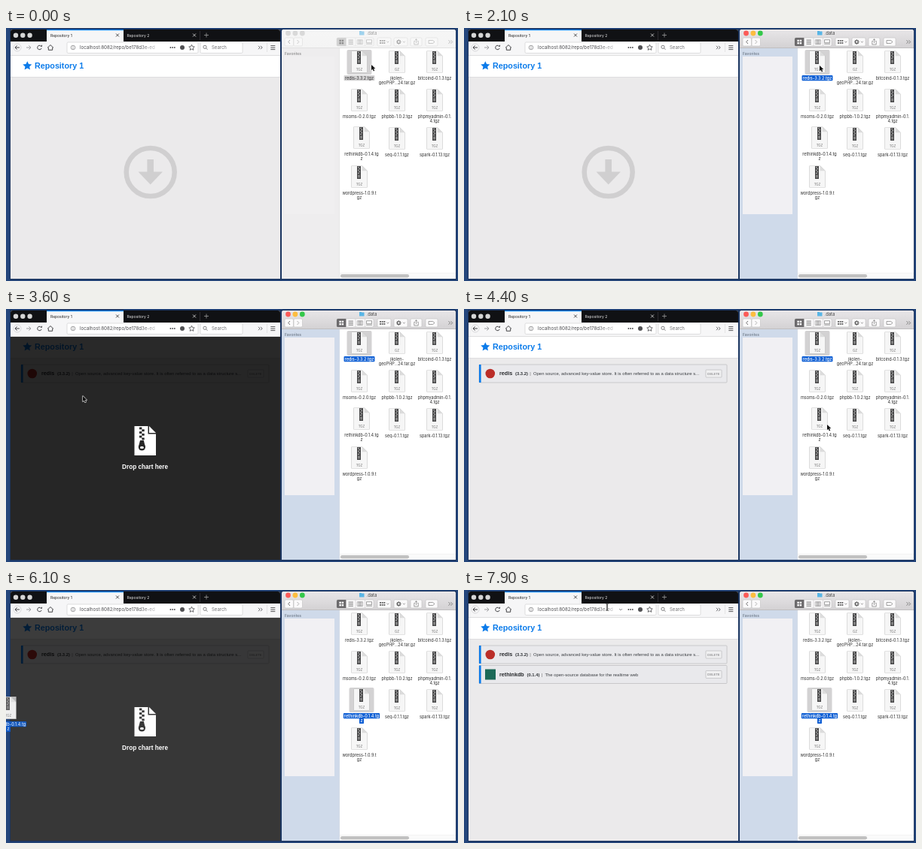
Write an HTML page with a canvas that moves like this. It is 600x337 px and loops after 8000 ms.

```html
<!DOCTYPE html>
<html lang="en">
<head>
<meta charset="utf-8">
<title>Chart upload demo</title>
<style>
html, body { margin: 0; width: 100%; height: 100%; overflow: hidden; background: #24467b; }
canvas { display: block; width: 600px; height: 337px; }
</style>
</head>
<body>
<canvas id="stage"></canvas>
<script>
const LOOP = 8000, W = 600, H = 337;
const UI = 'Inter, "Open Sans", sans-serif';
const WEB = '"Liberation Sans", Arial, sans-serif';
const BLUE = '#0b7bea';
const scale = Math.max(1, window.devicePixelRatio || 1);

function prepare(canvas) {
  canvas.width = W * scale;
  canvas.height = H * scale;
  const ctx = canvas.getContext('2d');
  ctx.scale(scale, scale);
  return ctx;
}
const stage = document.getElementById('stage');
const main = prepare(stage);
let c = main;

// drawing helpers
function rect(x, y, w, h, fill) {
  c.fillStyle = fill;
  c.fillRect(x, y, w, h);
}
function box(x, y, w, h, r, fill, line, lw = 0.6) {
  c.beginPath();
  c.roundRect(x, y, w, h, r);
  if (fill) { c.fillStyle = fill; c.fill(); }
  if (line) { c.strokeStyle = line; c.lineWidth = lw; c.stroke(); }
}
function dot(x, y, r, fill) {
  c.beginPath();
  c.arc(x, y, r, 0, 7);
  c.fillStyle = fill;
  c.fill();
}
function ring(x, y, r, color, lw, from = 0, to = 7) {
  c.beginPath();
  c.arc(x, y, r, from, to);
  c.strokeStyle = color;
  c.lineWidth = lw;
  c.stroke();
}
function trace(pts) {
  c.beginPath();
  for (let i = 0; i < pts.length; i += 2) c.lineTo(pts[i], pts[i + 1]);
}
function line(color, lw, ...pts) {
  trace(pts);
  c.strokeStyle = color;
  c.lineWidth = lw;
  c.stroke();
}
function poly(fill, ...pts) {
  trace(pts);
  c.closePath();
  c.fillStyle = fill;
  c.fill();
}
function text(s, x, y, size, fill, font = UI, weight = 400, align = 'left') {
  c.font = `${weight} ${size}px ${font}`;
  c.textAlign = align;
  c.textBaseline = 'alphabetic';
  c.fillStyle = fill;
  c.fillText(s, x, y);
}
function starPath(x, y, r) {
  const pts = [];
  for (let i = 0; i < 10; i++) {
    const a = i * Math.PI / 5 - Math.PI / 2, k = i % 2 ? r * 0.48 : r;
    pts.push(x + k * Math.cos(a), y + k * Math.sin(a));
  }
  trace(pts);
  c.closePath();
}
function cross(x, y, r, color) {
  line(color, 0.9, x - r, y - r, x + r, y + r);
  line(color, 0.9, x - r, y + r, x + r, y - r);
}
function chevrons(x, y, color) {
  for (const d of [0, 3]) line(color, 0.8, x + d - 3, y - 2.2, x + d - 0.8, y, x + d - 3, y + 2.2);
}

// keyframes: [time, value, ...], eased between neighbours
function at(keys, t) {
  if (t <= keys[0][0]) return keys[0].slice(1);
  for (let i = 1; i < keys.length; i++) {
    const a = keys[i - 1], b = keys[i];
    if (t <= b[0]) {
      const p = (t - a[0]) / (b[0] - a[0]), e = p * p * (3 - 2 * p);
      return a.slice(1).map((v, j) => v + (b[j + 1] - v) * e);
    }
  }
  return keys[keys.length - 1].slice(1);
}

const POINTER = [
  [0, 485, 49], [600, 485, 49], [1500, 472, 50], [2250, 472, 50], [3200, 102, 116],
  [3650, 102, 116], [4350, 482, 154], [4500, 482, 154], [4900, 463, 152], [5300, 463, 152],
  [6050, -6, 163], [6150, -6, 163], [6700, 77, 150], [7100, 77, 150], [7800, 190, 23]
];
const SHADE = [
  [2500, 0], [2750, 1], [3620, 1], [3950, 0], [5550, 0], [5800, 1], [6030, 1],
  [6180, 0.8], [6380, 1], [6850, 1], [7000, 0.66], [7250, 0]
];

const FILES = [
  [469, 45, 'redis-3.3.2.tgz'],
  [519, 45, 'jkolen-', 'geoPHP...24.tar.gz'],
  [569, 45, 'bitcoind-0.1.3.tgz'],
  [469, 96, 'msoms-0.2.0.tgz'],
  [519, 96, 'phpbb-1.0.2.tgz'],
  [569, 96, 'phpmyadmin-0.1.', '4.tgz'],
  [472, 146, 'rethinkdb-0.1.4.tg', 'z'],
  [519, 147, 'seq-0.1.1.tgz'],
  [569, 147, 'spark-0.1.13.tgz'],
  [469, 198, 'wordpress-1.0.9.t', 'gz']
];

function drawFile([x, y, ...names], mark) {
  if (mark) box(x - 16.5, y - 16, 33, 33, 2, '#d3d2d3');
  poly('#c5c5c5', x - 10.6, y - 14.6, x + 4, y - 14.6, x + 10.6, y - 8, x + 10.6, y + 14.6, x - 10.6, y + 14.6);
  poly('#f6f6f6', x - 10, y - 14, x + 3.7, y - 14, x + 10, y - 7.7, x + 10, y + 14, x - 10, y + 14);
  poly('#dcdcdc', x + 3.7, y - 14, x + 10, y - 7.7, x + 3.7, y - 7.7);
  rect(x - 3, y - 14, 5, 17, '#4a4a4b');
  for (let i = 0; i < 5; i++) rect(x - 1 + (i % 2 ? 0 : -1), y - 13 + i * 2, 2, 0.9, '#b9b9b9');
  box(x - 1.7, y - 2.5, 2.4, 4, 0.8, '#8c8c8c');
  text(names[0].startsWith('jkolen') ? 'GZ' : 'TGZ', x, y + 11.5, 4.3, '#858585', UI, 500, 'center');
  names.forEach((s, i) => {
    const ly = y + 23.6 + i * 6.8;
    c.font = `400 5.5px ${UI}`;
    if (mark) {
      const w = c.measureText(s).width + 3;
      box(x - w / 2, ly - 5.7, w, 7.4, 1.2, mark === 'active' ? '#0f5fd4' : '#d3d2d3');
    }
    text(s, x, ly, 5.5, mark === 'active' ? '#fff' : '#2d2d2d', UI, mark === 'active' ? 500 : 400, 'center');
  });
}

function drawFinder(t) {
  const on = t >= 500, ink = on ? '#636363' : '#a9a9a9', edge = on ? '#c0bfc0' : '#dcdcdc';
  box(366, 2, 231, 332, 3, '#fff');
  const g = c.createLinearGradient(0, 2, 0, 27);
  g.addColorStop(0, on ? '#e8e6e8' : '#f6f6f6');
  g.addColorStop(1, on ? '#d3d1d3' : '#f4f4f4');
  box(366, 2, 231, 25, [3, 3, 0, 0], g);
  rect(366, 26.4, 231, 0.6, on ? '#b5b3b5' : '#d5d5d5');
  ['#fc5b57', '#fdbd3f', '#34c84a'].forEach((col, i) => dot(374.5 + i * 9.4, 7, 3.4, on ? col : '#d9d9d9'));

  box(469, 4.6, 6.5, 5, 0.6, on ? '#58b5e6' : '#9fd2ed');
  rect(469, 4, 3, 1.2, on ? '#58b5e6' : '#9fd2ed');
  text('.data', 478.5, 9.4, 5.8, on ? '#444' : '#9b9b9b');

  const btn = on ? '#fbfafb' : '#f8f8f8';
  const button = (x, w) => box(x, 13, w, 11, 1.6, btn, edge);
  button(370, 11.5);
  button(382, 11.5);
  line(ink, 0.9, 377, 16, 374.7, 18.5, 377, 21);
  line(on ? '#aaa' : '#c4c4c4', 0.9, 386.5, 16, 388.8, 18.5, 386.5, 21);

  button(439, 49);
  box(439, 13, 12.5, 11, [1.6, 0, 0, 1.6], on ? '#6c6a6c' : '#d2d2d2');
  const tile = on ? '#fff' : '#8d8d8d';
  for (let i = 0; i < 4; i++) rect(442.4 + (i % 2) * 3.3, 15.7 + (i >> 1) * 3.3, 2.4, 2.4, tile);
  for (const x of [451.5, 463.7, 476]) rect(x, 13, 0.5, 11, edge);
  for (let i = 0; i < 4; i++) rect(454.5, 15.6 + i * 1.9, 6.4, 0.7, ink);
  for (let i = 0; i < 3; i++) box(466.3 + i * 2.4, 15.8, 2.4, 5.6, 0, null, ink, 0.5);
  box(478.5, 15.7, 7, 4, 0, null, ink, 0.6);
  for (let i = 0; i < 4; i++) rect(478.5 + i * 2, 20.7, 1.2, 1.1, ink);

  button(493, 18);
  for (let i = 0; i < 6; i++) rect(496 + (i % 3) * 2.7, 16 + (i > 2 ? 3 : 0), 1.9, 1.9, ink);
  line(ink, 0.7, 505.4, 17.8, 506.8, 19.2, 508.2, 17.8);
  button(515, 18);
  ring(521.3, 18.5, 1.9, ink, 1.3);
  for (let i = 0; i < 8; i++) {
    const a = i * Math.PI / 4;
    dot(521.3 + 2.9 * Math.cos(a), 18.5 + 2.9 * Math.sin(a), 0.55, ink);
  }
  line(ink, 0.7, 527, 17.8, 528.4, 19.2, 529.8, 17.8);
  button(537, 15);
  line(ink, 0.6, 543, 17.5, 541.8, 17.5, 541.8, 22, 547.2, 22, 547.2, 17.5, 546, 17.5);
  line(ink, 0.6, 544.5, 20, 544.5, 14.8);
  line(ink, 0.6, 543, 16.2, 544.5, 14.6, 546, 16.2);
  button(557, 16);
  line(ink, 0.6, 561, 16.5, 566.6, 16.5, 569, 18.5, 566.6, 20.5, 561, 20.5, 561, 16.5);
  chevrons(590.5, 18.5, ink);

  rect(366, 27, 76.5, 307, on ? '#cfdaea' : '#eeedee');
  rect(442.3, 27, 0.5, 307, on ? '#bfc9d8' : '#d8d8d8');
  text('Favorites', 370, 35.8, 5, on ? '#6b7685' : '#858585', UI, 500);
  rect(370, 38, 66, 210, on ? '#f1f0f3' : '#f0eff0');

  rect(443, 326.5, 154, 7.5, '#fafafa');
  rect(443, 326.3, 154, 0.4, '#e4e4e4');
  box(444, 328, 91, 4.4, 2.2, '#c1c1c1');
  const picked = t < 4900 ? 0 : 6;
  FILES.forEach((f, i) => drawFile(f, i === picked && (on ? 'active' : 'idle')));
}

function drawChrome(t) {
  box(6, 2, 358, 332, [3, 3, 0, 0], '#ebeaeb');
  box(6, 2, 358, 16, [3, 3, 0, 0], '#101114');
  for (let i = 0; i < 3; i++) dot(13 + i * 9.3, 9.7, 3.2, '#d6d6d6');
  rect(54, 2, 102, 16, '#f6f6f7');
  rect(54, 2, 102, 1.2, '#0a84ff');
  text('Repository 1', 59, 11.6, 5, '#1c1c1c');
  cross(148, 9.5, 2, '#3a3a3a');
  text('Repository 2', 160.5, 11.6, 5, '#ededed');
  cross(250, 9.5, 2, '#cfcfcf');
  rect(257, 4, 0.5, 12, '#4a4b50');
  line('#9b9b9b', 0.8, 263, 9.5, 269, 9.5);
  line('#9b9b9b', 0.8, 266, 6.5, 266, 12.5);

  rect(6, 18, 358, 19, '#f6f6f7');
  rect(6, 36.4, 358, 0.6, '#cfcfd1');
  const ink = '#454548';
  ring(15, 26, 5, '#c5c5c8', 0.6);
  line(ink, 1, 18, 26, 12, 26);
  line(ink, 1, 14.6, 23.4, 12, 26, 14.6, 28.6);
  line('#9d9da0', 1, 27, 26, 33, 26);
  line('#9d9da0', 1, 30.4, 23.4, 33, 26, 30.4, 28.6);
  ring(44.5, 26, 2.8, ink, 1, 0.3, 5.4);
  poly(ink, 45.4, 24.8, 48, 24.8, 48, 22.2);
  line(ink, 1, 55, 26.3, 59, 22.6, 63, 26.3);
  line(ink, 1, 56.3, 26, 56.3, 29.3, 61.7, 29.3, 61.7, 26);

  box(81, 19, 174, 14.5, 1.5, '#fff', '#c9c9cc');
  ring(89, 26, 2.8, '#77777a', 0.7);
  rect(88.6, 25.6, 0.8, 2, '#77777a');
  rect(88.6, 24.2, 0.8, 0.8, '#77777a');
  const fade = c.createLinearGradient(178, 0, 203, 0);
  fade.addColorStop(0, '#4a4a4d');
  fade.addColorStop(1, '#e4e4e6');
  text('localhost:8082/repo/be178d3e-ed', 98, 28.2, 6.2, fade);
  if (t > 7700) line('#77777a', 0.8, 206, 25, 208, 27, 210, 25);
  for (let i = 0; i < 3; i++) dot(218.4 + i * 2.7, 26, 0.9, ink);
  dot(234, 26, 3, '#505053');
  starPath(246.5, 26.2, 3.9);
  c.strokeStyle = ink;
  c.lineWidth = 0.8;
  c.stroke();

  box(258, 19, 56, 14.5, 1.5, '#fff', '#c9c9cc');
  ring(264, 25.3, 2.1, '#606063', 0.8);
  line('#606063', 0.8, 265.5, 26.8, 267.5, 28.8);
  text('Search', 273, 28.2, 6, '#707073');
  chevrons(338, 26, ink);
  rect(346, 20, 0.5, 12, '#d0d0d2');
  for (let i = 0; i < 3; i++) rect(351.3, 23.2 + i * 2.5, 6, 0.9, ink);
}

function drawCard(y, name, version, note, descX) {
  box(20, y, 329, 24, 1, '#e9e9ec', '#bfbfc2', 0.8);
  rect(20, y, 2.6, 24, BLUE);
  text(name, 47, y + 14.4, 7.2, '#26282b', WEB, 700);
  text(version, descX - 24, y + 14, 5.9, '#33363a', WEB, 700);
  text('|', descX - 4.8, y + 14, 5.9, '#666', WEB);
  text(note, descX, y + 14, 5.9, '#3b3e42', WEB);
  box(321, y + 7, 21, 10, 0.8, '#f0f0f1', '#b4b4b7');
  text('DELETE', 331.5, y + 13.6, 4.2, '#6a6a6d', WEB, 400, 'center');
}

function drawPage(t) {
  rect(6, 37, 358, 28.5, '#fff');
  rect(6, 65.2, 358, 0.8, '#d9d9db');
  starPath(28.3, 50.5, 6.3);
  c.fillStyle = BLUE;
  c.fill();
  text('Repository 1', 38, 53.9, 10.75, BLUE, WEB, 700);

  if (t < 3400) {
    ring(191.7, 192, 32, '#d0cfd0', 6.5);
    rect(187.4, 175, 8.6, 18, '#d0cfd0');
    poly('#d0cfd0', 175.5, 191.5, 207.9, 191.5, 191.7, 208.5);
    return;
  }
  drawCard(74, 'redis', '(3.3.2)',
    'Open source, advanced key-value store. It is often referred to as a data structure s...', 92);
  dot(34.8, 86, 6.3, '#bb2e29');
  if (t < 6850) return;
  drawCard(100.5, 'rethinkdb', '(0.1.4)', 'The open-source database for the realtime web', 107.5);
  if (t > 7100) rect(28, 105.5, 14, 14, '#1c6a58');
}

// the drop shade is built once and faded as a whole
const shade = document.createElement('canvas');
function buildShade() {
  c = prepare(shade);
  poly('#fff', 170.5, 156, 188.5, 156, 188.5, 166.5, 199, 166.5, 199, 195, 170.5, 195);
  poly('#fff', 190, 156, 199, 165, 190, 165);
  c.globalCompositeOperation = 'destination-out';
  for (let i = 0; i < 6; i++) rect(i % 2 ? 180.3 : 177, 157.5 + i * 2.8, 3.4, 2.8, '#000');
  poly('#000', 178, 175, 182.8, 175, 185, 184, 175.8, 184);
  dot(180.4, 184, 4.6, '#000');
  c.globalCompositeOperation = 'source-over';
  box(178, 183, 4.8, 3, 1.5, '#fff');
  text('Drop chart here', 184.6, 212.8, 8.2, '#fff', WEB, 700, 'center');
  c.globalCompositeOperation = 'destination-over';
  rect(6, 37, 358, 297, 'rgba(0,0,0,.84)');
  c = main;
}

function drawGhost(file, dx, dy) {
  c.save();
  c.globalAlpha = 0.85;
  c.translate(dx, dy);
  const [x, y] = file;
  // clear of the grey selection tile
  c.beginPath();
  c.rect(x - 10.6, y - 15, 21.2, 30);
  c.rect(x - 30, y + 17.2, 60, 16);
  c.clip();
  drawFile(file, 'active');
  c.restore();
}

function drawPointer(x, y, t) {
  if (t > 7700) {
    line('#fff', 2, x, y - 4, x, y + 4);
    line('#222', 0.8, x - 1.5, y - 4.5, x, y - 4, x, y + 4, x - 1.5, y + 4.5);
    line('#222', 0.8, x + 1.5, y - 4.5, x, y - 4, x, y + 4, x + 1.5, y + 4.5);
    return;
  }
  c.save();
  c.translate(x, y);
  trace([0, 0, 0, 7.2, 1.7, 5.7, 2.9, 8.4, 4.2, 7.8, 3, 5.2, 5.2, 5.1]);
  c.closePath();
  c.fillStyle = '#111';
  c.strokeStyle = '#f4f4f4';
  c.lineWidth = 1.2;
  c.lineJoin = 'round';
  c.stroke();
  c.fill();
  c.restore();
}

function draw(t) {
  rect(0, 0, W, H, '#24467b');
  rect(5, 1, 593, 334.5, '#1b3560');
  drawFinder(t);
  drawChrome(t);
  drawPage(t);
  const [o] = at(SHADE, t);
  if (o > 0) {
    c.globalAlpha = o;
    c.drawImage(shade, 0, 0, W, H);
    c.globalAlpha = 1;
  }
  const [x, y] = at(POINTER, t);
  if (t > 2250 && t < 3300) drawGhost(FILES[0], x - 472, y - 50);
  if (t > 5300 && t < 6750) drawGhost(FILES[6], x - 463, y - 152);
  drawPointer(x, y, t);
}

buildShade();
const start = performance.now();
function tick() {
  draw((performance.now() - start) % LOOP);
  requestAnimationFrame(tick);
}
draw(0);
requestAnimationFrame(tick);
</script>
</body>
</html>
```
